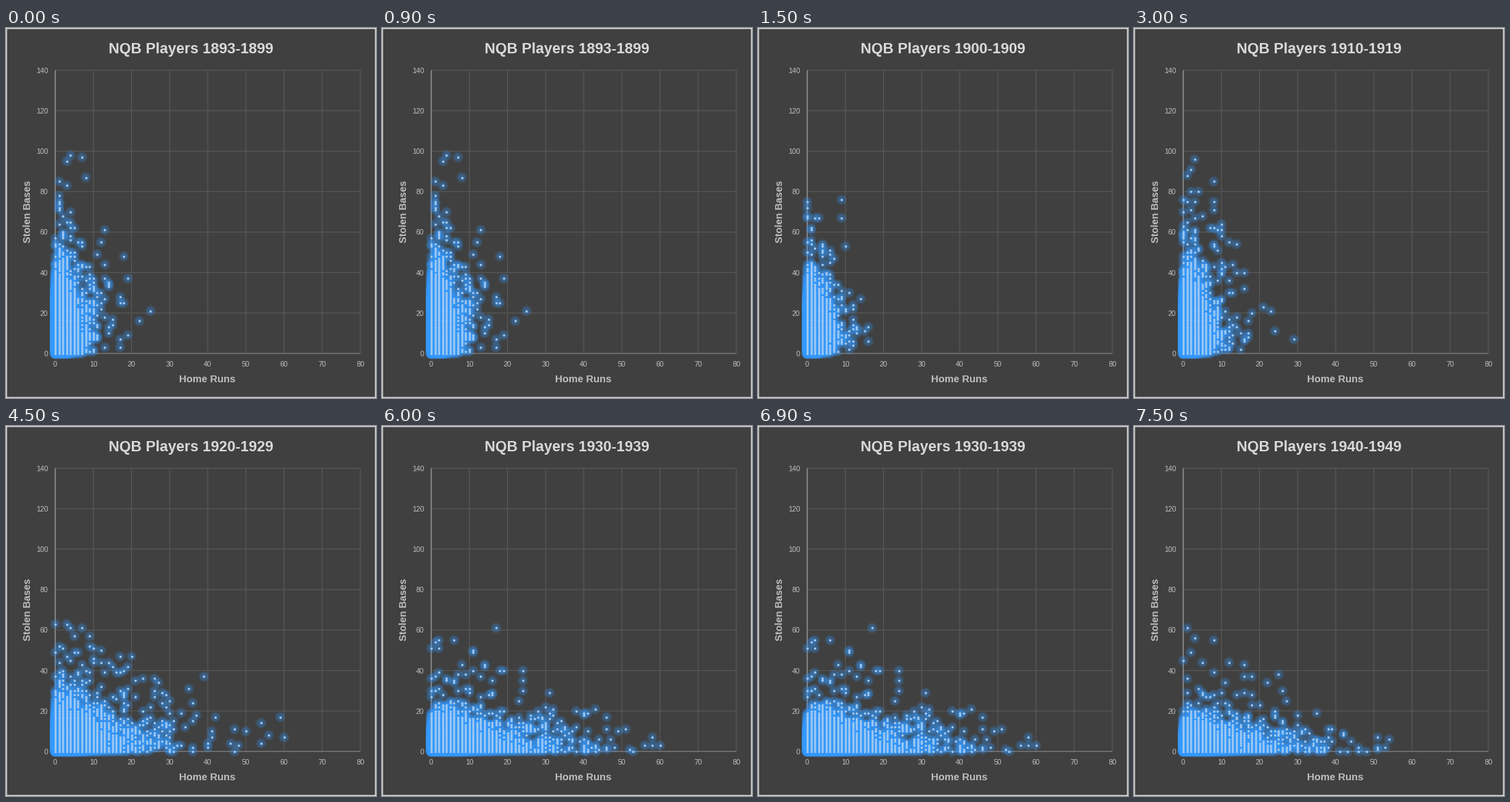
Write a matplotlib script that moves like this. It is 541 by 541 pixels and loops after 8 s.

```python
import numpy as np
import matplotlib.pyplot as plt
from matplotlib.animation import FuncAnimation
from matplotlib.patches import Rectangle

SIZE, DPI = 541, 100
X0, Y0 = 72.0, 475.8          # pixel position of (0, 0)
SX, SY = 5.575, 2.957         # pixels per unit
PT = 72 / DPI
STEP_MS, HOLD, STEPS = 500, 3, 16

plt.rcParams["font.family"] = "Liberation Sans"


def halo(xy, weights, radius=8.5, peak=0.42, reach=10):
    """Blend a soft blue disc around every point."""
    pad = reach + 2
    clear = np.zeros((SIZE + 2 * pad, SIZE + 2 * pad))
    r = np.arange(-reach, reach + 1)
    for (x, y), w in zip(xy, weights):
        cx, cy = int(x), int(y)
        dist = np.hypot(r[None, :] + cx + 0.5 - x, r[:, None] + cy + 0.5 - y)
        alpha = peak * np.clip(1 - (dist / radius) ** 2, 0, 1)
        rows = slice(cy + pad - reach, cy + pad + reach + 1)
        cols = slice(cx + pad - reach, cx + pad + reach + 1)
        clear[rows, cols] += w * np.log(1 - alpha)
    rgba = np.empty((SIZE, SIZE, 4))
    rgba[..., :3] = 0.2, 0.6, 1.0
    rgba[..., 3] = 1 - np.exp(clear[pad:-pad, pad:-pad])
    return rgba


class Era:
    """Seeded crowd of seasons plus a few record ones.

    level: log size of the crowd; fade: thinning with home runs;
    speed: scale of stolen bases; floor: lack of slow sluggers.
    """

    def __init__(self, years, level, fade, speed, floor, records):
        self.title = "NQB Players " + years
        rng = np.random.default_rng(int(years[:4]))
        h, s = np.meshgrid(np.arange(61), np.arange(99), indexing="ij")
        span = speed * (1 - 0.25 * np.exp(-h / 2))
        core = np.exp(level - fade * np.sqrt(h + 2) - (s / span) ** 1.5)
        tail = 3 * np.exp(-h * fade / 18 - s / (1.4 * speed))
        count = (core + tail) * np.exp(-floor * h / (s + 3))

        seen = rng.random(count.shape) < 1 - np.exp(-count)
        # nothing may outdo the records
        best_h, best_s = np.max(records, axis=0)
        seen &= (h / best_h + s / best_s) < 1.1
        for point in records:
            seen[point] = True
        pts = np.argwhere(seen)
        self.xy = pts * (SX, -SY) + (X0, Y0)
        self.glow = halo(self.xy, 1 + np.minimum(count[seen] / 4, 9))


eras = [
    Era("1893-1899", 11.7, 3.35, 16.5, 0.6,
        [(4, 98), (7, 97), (8, 87), (1, 78), (13, 61), (18, 48), (19, 37), (25, 21), (17, 3)]),
    Era("1900-1909", 11.7, 3.4, 14.8, 1.0,
        [(9, 76), (9, 67), (2, 67), (3, 67), (10, 53), (14, 27), (16, 13), (16, 6)]),
    Era("1910-1919", 11.7, 3.25, 15.3, 0.6,
        [(3, 96), (1, 88), (8, 85), (8, 75), (0, 63), (12, 55), (21, 23), (24, 11), (29, 7)]),
    Era("1920-1929", 8.3, 1.75, 10.7, 0,
        [(3, 63), (1, 52), (10, 51), (19, 42), (39, 37), (42, 17), (47, 11), (54, 14), (54, 4), (59, 17), (60, 7)]),
    Era("1930-1939", 7.9, 1.42, 7.8, 0,
        [(17, 61), (2, 51), (11, 40), (13, 37), (38, 20), (46, 17), (49, 10), (58, 7), (58, 3), (56, 3)]),
    Era("1940-1949", 8.2, 1.52, 6.5, 0,
        [(1, 61), (3, 56), (8, 55), (2, 49), (5, 44), (16, 37), (30, 18), (44, 5), (51, 2), (51, 1), (54, 6)]),
]

fig = plt.figure(figsize=(SIZE / DPI, SIZE / DPI), dpi=DPI, facecolor="#404040")
ax = fig.add_axes([0, 0, 1, 1])


def label(x, y, text, px, color="#bfbfbf", **kw):
    return ax.text(x, y, text, fontsize=px * PT, color=color, va="baseline", **kw)


def line(xs, ys, color):
    ax.plot(xs, ys, color=color, lw=1.2 * PT, solid_capstyle="butt", snap=False, zorder=1)


right, top = X0 + 80 * SX, Y0 - 140 * SY
for v in range(0, 81, 10):
    x = X0 + v * SX
    line([x, x], [top, Y0], "#595959")
    label(x, 495, str(v), 10.6, ha="center")
for v in range(0, 141, 20):
    y = Y0 - v * SY
    line([X0, right], [y, y], "#595959")
    label(61.5, y + 4, str(v), 10.6, ha="right")
line([X0, X0], [top, Y0], "#a0a0a0")
line([X0, right], [Y0, Y0], "#808080")

label(294.5, 518, "Home Runs", 14.9, ha="center", weight="bold")
label(36, 268.5, "Stolen Bases", 14.5, ha="center", weight="bold",
      rotation=90, rotation_mode="anchor")
title = label(270.5, 37, "", 21.7, "#d9d9d9", ha="center", weight="bold")

glow = ax.imshow(eras[0].glow, extent=(0, SIZE, SIZE, 0), interpolation="nearest", zorder=2)
dots = ax.scatter([], [], s=(3.4 * PT) ** 2, color="#9fc8f0", linewidths=0, zorder=3)
ax.add_patch(Rectangle((0.75, 0.75), SIZE - 1.5, SIZE - 1.5, fill=False,
                       ec="#d9d9d9", lw=1.5 * PT, snap=False))
ax.set(xlim=(0, SIZE), ylim=(SIZE, 0), aspect="auto")
ax.axis("off")


def draw(i):
    era = eras[i // HOLD]
    title.set_text(era.title)
    glow.set_data(era.glow)
    dots.set_offsets(era.xy)
    return title, glow, dots


anim = FuncAnimation(fig, draw, frames=STEPS, init_func=lambda: draw(0),
                     interval=STEP_MS, repeat=True, repeat_delay=0)
plt.show()
```
